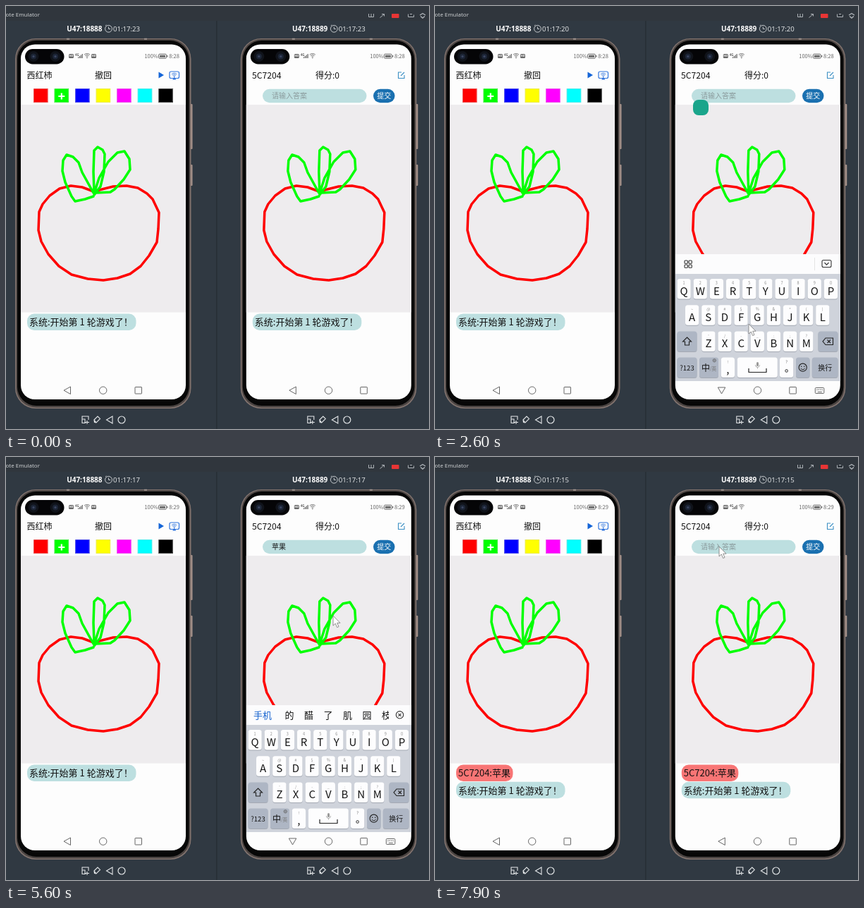
An HTML page with a canvas for the animation above (8 s loop, 600 by 600 pixels).

```html
<!DOCTYPE html>
<html lang="zh">
<head>
<meta charset="utf-8">
<title>Draw and guess</title>
<style>
html, body { margin: 0; width: 100%; height: 100%; overflow: hidden; background: #303942; }
canvas { display: block; width: 600px; height: 600px; }
</style>
</head>
<body>
<canvas id="stage"></canvas>
<script>
const LOOP = 8000, GAP = 320;
const CJK = '"Noto Sans CJK SC", "Noto Sans CJK", sans-serif';
const SANS = '"Open Sans", sans-serif';
const PLAYER = '5C7204', DEVICE = 'U47';
const BLUE = '#0a59f7', TEAL = '#bddfe0';

const canvas = document.getElementById('stage');
const scale = window.devicePixelRatio || 1;
canvas.width = canvas.height = 600 * scale;
const c = canvas.getContext('2d');

const T = {
  keysIn: 2050, typeP: 3200, minute: 3350, typeG: 4050, pick: 5050,
  submit: 6300, message: 6750, keysOut: 6900, slide: 200, tick: 300
};

// Pointer stops: time, x, y
const STOPS = [
  [500, 470, 620], [1300, 444, 126], [1900, 444, 126], [2500, 445, 451],
  [2700, 445, 451], [3100, 560, 404], [3300, 560, 404], [3800, 452, 441],
  [4150, 452, 441], [4750, 364, 368], [5150, 364, 368], [5950, 532, 128],
  [7250, 532, 128], [7850, 403, 127]
];

const FRUIT = new Path2D('M124 263L108 257 92 255 76 259 62 269 52 281 47 292 46 318 50 334 60 352 75 369 93 381 116 387 138 389 158 386 176 380 191 369 203 354 214 335 216 316 217 293 208 274 200 266 187 258 171 255 152 256Z');
const LEAVES = new Path2D('M124 265L108 236 103 222 95 214 86 211 81 219 80 234 84 250 93 270 98 277 112 274 124 270M125 264L124 235 125 205 130 200 137 204 140 210 139 235 134 256 125 268M125 266L132 244 145 221 158 208 168 206 175 217 176 232 167 246 154 260 148 264 127 265');
const ARROW = new Path2D('M0 0V14L3.3 11 5.6 16.5 8 15.5 5.7 10.2H10Z');

const clamp = v => Math.max(0, Math.min(1, v));
const ease = u => u * u * (3 - 2 * u);
const between = (t, a, b) => t >= a && t < b;

function text(s, x, y, size, color = '#111', align = 'left', font = CJK, weight = 400) {
  c.font = `${weight} ${size}px ${font}`;
  c.textAlign = align;
  c.fillStyle = color;
  c.fillText(s, x, y + size * 0.37);
}

function box(x, y, w, h, r, fill, stroke, lw = 1) {
  c.beginPath();
  c.roundRect(x, y, w, h, r);
  paint(fill, stroke, lw);
}

function dot(x, y, r, fill, stroke, lw = 1) {
  c.beginPath();
  c.arc(x, y, r, 0, 7);
  paint(fill, stroke, lw);
}

function shape(d, fill, stroke, lw = 1) {
  const p = new Path2D(d);
  if (fill) { c.fillStyle = fill; c.fill(p); }
  if (stroke) { c.strokeStyle = stroke; c.lineWidth = lw; c.stroke(p); }
}

function paint(fill, stroke, lw) {
  if (fill) { c.fillStyle = fill; c.fill(); }
  if (stroke) { c.strokeStyle = stroke; c.lineWidth = lw; c.stroke(); }
}

function wifi(x, y, r, color) {
  dot(x, y, 0.8, color);
  for (let i = 1; i < 4; i++) {
    c.beginPath();
    c.arc(x, y, r * i / 3, -2.3, -0.84);
    paint(null, color, 0.9);
  }
}

function desktop() {
  c.fillStyle = '#303942';
  c.fillRect(0, 0, 600, 600);
  c.fillStyle = '#30363d';
  c.fillRect(0, 0, 600, 21);
  c.fillStyle = '#272e35';
  c.fillRect(298, 21, 1.5, 579);
  text('ote Emulator', -0.5, 12, 8, '#d5d8da', 'left', SANS);
  const g = '#aeb3b8';
  shape('M514.5 11V15.5H521.5V11M518 11V15', null, g);
  shape('M530.5 16.5L536.5 11.5M533 11.5H536.5V14.5', null, g);
  box(547, 11, 10.5, 6, 1, '#e83535');
  shape('M570.5 11.5V15.5H578.5V12.5M573 11.5H576', null, g);
  shape('M587 13L591 10.5 595 13M588 14.5L591 17 594 14.5', null, g, 1.4);
}

function statusBar(left, time) {
  const g = '#676767';
  box(89, 68, 7, 6, 1.5, g);
  text('HD', 92.5, 71, 4, '#fff', 'center', SANS, 700);
  text('4G', 98, 69, 4.5, g, 'left', SANS, 700);
  for (let i = 0; i < 4; i++) {
    c.fillStyle = g;
    c.fillRect(102 + i * 1.9, 72.5 - i * 1.5, 1.2, 1.5 + i * 1.5);
  }
  wifi(115, 73.5, 6, g);
  if (left) {
    box(121, 68, 7, 6, 1.5, g);
    text('HD', 124.5, 71, 4, '#fff', 'center', SANS, 700);
  }
  text('100%', 196.5, 71.5, 7.4, g);
  box(216.5, 68.2, 11, 6, 1.5, null, g);
  box(218, 69.7, 8, 3, 0.5, g);
  box(228.3, 70, 1.2, 2.5, 0.4, g);
  text(time, 246, 71.5, 7.6, g, 'right');
}

function toolIcons() {
  const w = '#e3e6e8';
  shape('M113 591.5H108V582H117V587M108 586H112V591M115 588V593M112.5 590.5H118', null, w, 1.1);
  shape('M125 587L130 582 133.5 585.5 128 591ZM125 587L125.5 590.5 128 591', null, w, 1.1);
  shape('M151 582V592L142.5 587Z', null, w, 1.1);
  dot(164, 587, 5, null, w, 1.2);
}

function phone(port, left, sec, time) {
  text(`${DEVICE}:${port}`, 136.5, 32, 10, '#fff', 'right', SANS, 700);
  dot(145.5, 32.3, 4.9, null, '#c9cdd0', 1);
  shape('M145.5 29.5V32.5H148M141 28L142.5 26.8', null, '#c9cdd0');
  text(`01:17:${sec}`, 152, 32, 9.6, '#eef0f1', 'left', SANS);

  box(261, 139, 3.5, 64, 1, '#a8948c');
  box(261, 225, 3.5, 30, 1, '#a8948c');
  box(13, 46, 249.5, 525, 29, '#83746f');
  box(14.5, 47, 246.5, 522.5, 28, '#4a4442');
  box(16, 49, 243.5, 518, 27, '#070707');
  c.fillStyle = '#a89a94';
  for (const x of [86, 196]) c.fillRect(x, 45.8, 4, 1.8);
  box(21, 54.5, 234, 503.5, 20, '#fdfdfd');
  box(27, 61, 55.5, 21.5, 10.7, '#050507');
  for (const x of [39, 70]) {
    dot(x, 71.5, 7.5, '#10131a');
    dot(x, 71.5, 4, '#1c2536');
    dot(x, 71.5, 1.6, '#3b4560');
  }
  statusBar(left, time);
  c.fillStyle = '#eeecee';
  c.fillRect(21, 140, 234, 294.5);
  c.lineJoin = c.lineCap = 'round';
  c.lineWidth = 3.5;
  c.strokeStyle = '#f00';
  c.stroke(FRUIT);
  c.strokeStyle = '#0f0';
  c.stroke(LEAVES);
  c.lineJoin = 'miter';
  c.lineCap = 'butt';
  toolIcons();
}

function messages(shown) {
  let y = 436.5;
  if (shown) {
    box(30, y, 80.5, 23.5, 10, '#f87575');
    text(`${PLAYER}:苹果`, 33, y + 12, 13);
    y += 24.3;
  }
  box(30, y, 154.5, 23.5, 10, TEAL);
  text('系统:开始第 1 轮游戏了！', 33, y + 12, 13);
}

function nav(keys) {
  const g = '#666';
  shape(keys ? 'M81.5 541H92L86.7 550Z' : 'M91.5 540V550.5L82 545.2Z', null, g);
  dot(137.7, 545.2, 5.2, null, g);
  box(183, 540.5, 9.5, 9.5, 0.5, null, g);
  if (!keys) return;
  box(219.5, 541.5, 12.5, 8, 1, null, g);
  for (let i = 0; i < 4; i++) box(221.5 + i * 2.4, 543.7, 1.3, 1.3, 0, g);
  box(223, 547, 6, 1, 0, g);
}

function painterBar() {
  text('西红柿', 29.5, 98.5, 12);
  text('撤回', 126, 98.5, 12);
  shape('M216.5 93.5V102.5L224 98Z', '#1565d8');
  box(232, 93, 13.5, 9.5, 2, null, '#2f74dd', 1.2);
  wifi(238.7, 101, 5.5, '#2f74dd');
  shape('M236 104.5L238.7 101 241.5 104.5Z', '#2f74dd');
  ['#f00', '#0f0', '#00f', '#ff0', '#f0f', '#0ff', '#000'].forEach((color, i) => {
    const x = 39 + i * 29.55;
    c.fillStyle = color;
    c.fillRect(x, 117, 20.5, 20);
    c.setLineDash([1, 1]);
    c.strokeStyle = 'rgba(200,200,200,.7)';
    c.lineWidth = 1;
    c.strokeRect(x + 0.5, 117.5, 19.5, 19);
    c.setLineDash([]);
  });
  shape('M78.8 123.5V132.5M74.3 128H83.3', null, '#fff', 2.2);
}

function guessBar(t) {
  text(PLAYER, 349, 98.5, 12.2);
  text('得分:0', 439, 98.5, 12);
  shape('M561 94H556.5V102.5H565V98M560 99L565 94', null, '#3b8fc4', 1.1);
  box(364, 117.8, 147.5, 19.4, 9.7, TEAL);
  if (between(t, T.pick, T.submit)) text('苹果', 377, 127.7, 10);
  else text('请输入答案', 377, 127.7, 10, '#8b9b9d');
  box(521, 117.8, 30.5, 19.4, 9.7, '#1a70b0');
  text('提交', 536.2, 127.7, 10, '#fff', 'center', CJK, 500);
  if (between(t, T.keysIn, T.pick)) box(366, 133, 22, 22, 8, '#1aa58b');
}

function key(x, y, w, label, dark, size = 15, small = '') {
  box(x, y + 1, w, 28.5, 3.5, '#a4a9b3');
  box(x, y, w, 28.5, 3.5, dark ? '#aeb6c4' : '#fdfdfe');
  if (label) text(label, x + w / 2, y + (size > 12 ? 17 : 15), size, '#161616', 'center');
  if (small) text(small, x + w / 2, y + 6, 5.5, '#8d8d8d', 'center');
}

function letters(row, hints, x, y) {
  [...row].forEach((ch, i) => key(x + i * 23.15, y, 19.2, ch, false, 15, hints[i]));
}

function candidates(t) {
  const typing = between(t, T.typeP, T.pick);
  const g = '#333';
  if (t < T.typeP) {
    for (const x of [354, 360]) for (const y of [361, 367]) box(x, y, 4.3, 4.3, 1, null, g, 1.1);
    box(538, 357, 0.8, 18, 0, '#ddd');
    box(549, 360.5, 13, 10, 2, null, g, 1.1);
    shape('M552.5 364L555.5 367.2 558.5 364', null, g, 1.1);
    return;
  }
  const put = (s, x, first) => text(s, x, 366, 13, first ? '#1663cf' : '#111');
  if (t < T.typeG) {
    put('怕', 351, true);
    [...'拍跑陪票平'].forEach((s, i) => put(s, 383 + i * 27.4));
    put('p', 520.5);
  } else if (t < T.pick) {
    put('苹果', 351, true);
    dot(402.3, 367.5, 5.7, '#d8261c');
    dot(407, 367.5, 5.7, '#d8261c');
    dot(401, 365.5, 1.8, '#f17a62');
    shape('M404.5 363Q405 359.5 407 358', null, '#7a4a25', 1.2);
    shape('M405.5 361Q408 357 412 359Q409 362.5 405.5 361Z', '#5aa637');
    put('屁股', 428);
    put('拍个', 469);
    put('排骨', 509.5);
  } else {
    put('手机', 351, true);
    c.save();
    c.beginPath();
    c.rect(341, 352, 202, 28);
    c.clip();
    [...'的醋了肌园枝'].forEach((s, i) => put(s, 395.5 + i * 27.5));
    c.restore();
    dot(558.5, 365.8, 5.2, null, g, 1.1);
    shape('M556.5 363.8L560.5 367.8M560.5 363.8L556.5 367.8', null, g, 1.1);
  }
  if (typing) shape('M553.5 363.5L558.5 368.3 563.5 363.5', null, g, 1.2);
}

function keyboard(t, lift) {
  const typing = between(t, T.typeP, T.pick);
  c.save();
  c.beginPath();
  c.rect(341, 325, 234, 207);
  c.clip();
  c.translate(0, (1 - lift) * 182);
  if (typing) {
    const s = t < T.typeG ? 'p' : "p'g";
    const end = t < T.typeG ? 359 : 369;
    box(341, 335, end - 338, 18, [0, 5, 0, 0], '#fafafb');
    text(s, 346, 343.5, 13);
    shape(`M${end - 1.5} 340L${end + 1.5} 335.5`, null, '#555', 1.6);
  }
  c.fillStyle = '#fcfcfd';
  c.fillRect(341, 352, 234, 28);
  c.fillStyle = '#cfd3db';
  c.fillRect(341, 380, 234, 152);
  candidates(t);

  letters('QWERTYUIOP', '1234567890', 343.5, 387);
  letters('ASDFGHJKL', '~@#$%&*()', 355, 424.3);
  letters('ZXCVBNM', "'/-_:;?", 378.3, 461.5);
  const ink = '#222';
  key(343.5, 461.5, 28, '', true);
  shape('M357.5 470L363.5 476H360.5V481H354.5V476H351.5Z', null, ink, 1.1);
  key(543.5, 461.5, 28, '', true);
  shape('M550 475.8L554 471H564.5V480.5H554ZM556.5 473.5L561 478M561 473.5L556.5 478', null, ink, 1.1);

  const y = 498.5;
  key(343.5, y, 28, '?123', true, 9.5);
  key(375, y, 27, '', true);
  text('中', 378, 513.5, 12);
  text('/英', 389.5, 514.5, 7, '#777');
  dot(396.3, 502.8, 2.2, null, '#666', 0.8);
  shape('M394 502.8H398.6M396.3 500.6V505', null, '#666', 0.5);
  key(405.8, y, 19.2, ',', false, 15, '!');
  key(428.8, y, 57, '', false);
  shape('M445 514V519.5H470V514', null, ink, 1.2);
  box(456, 505, 3, 6, 1.5, '#999');
  shape('M454.5 509Q454.5 512.5 457.5 512.5T460.5 509M457.5 512.5V514.5', null, '#999', 0.8);
  key(489, y, 19.2, '', false);
  text('?', 498.6, 505, 6, '#666', 'center');
  dot(498.6, 517.5, 1.8, null, ink);
  key(512, y, 19.5, '', true);
  dot(521.7, 512.7, 5.6, null, ink, 1.1);
  dot(519.7, 511.2, 0.8, ink);
  dot(523.7, 511.2, 0.8, ink);
  shape('M518.7 514Q521.7 517.5 524.7 514', null, ink);
  key(534.8, y, 36.7, typing ? '' : '换行', true, 10);
  if (typing) {
    box(534.8, y, 36.7, 28.5, 3.5, BLUE);
    text('确认', 553.2, 513.3, 10.5, '#fff', 'center');
  }
  c.restore();
}

function pointer(t) {
  if (t < STOPS[0][0]) return;
  let i = 0;
  while (i < STOPS.length - 2 && t >= STOPS[i + 1][0]) i++;
  const [t0, x0, y0] = STOPS[i], [t1, x1, y1] = STOPS[i + 1];
  const u = ease(clamp((t - t0) / (t1 - t0)));
  c.save();
  c.translate(x0 + (x1 - x0) * u, y0 + (y1 - y0) * u);
  c.fillStyle = '#fff';
  c.fill(ARROW);
  c.strokeStyle = '#777';
  c.lineWidth = 0.8;
  c.stroke(ARROW);
  c.restore();
}

function draw(t) {
  c.setTransform(scale, 0, 0, scale, 0, 0);
  const sec = 22 - Math.floor((t - T.tick) / 1000);
  const time = t < T.minute ? '8:28' : '8:29';
  const lift = ease(clamp((t - T.keysIn) / T.slide)) - ease(clamp((t - T.keysOut) / T.slide));

  desktop();
  phone(18888, true, sec, time);
  painterBar();
  messages(t >= T.message);
  nav(false);

  c.save();
  c.translate(GAP - 0.2, 0);
  phone(18889, false, sec, time);
  messages(t >= T.message);
  nav(lift > 0);
  c.restore();
  guessBar(t);
  if (lift > 0) keyboard(t, lift);
  pointer(t);
}

const start = performance.now();
function frame() {
  draw((performance.now() - start) % LOOP);
  requestAnimationFrame(frame);
}
frame();
</script>
</body>
</html>
```
